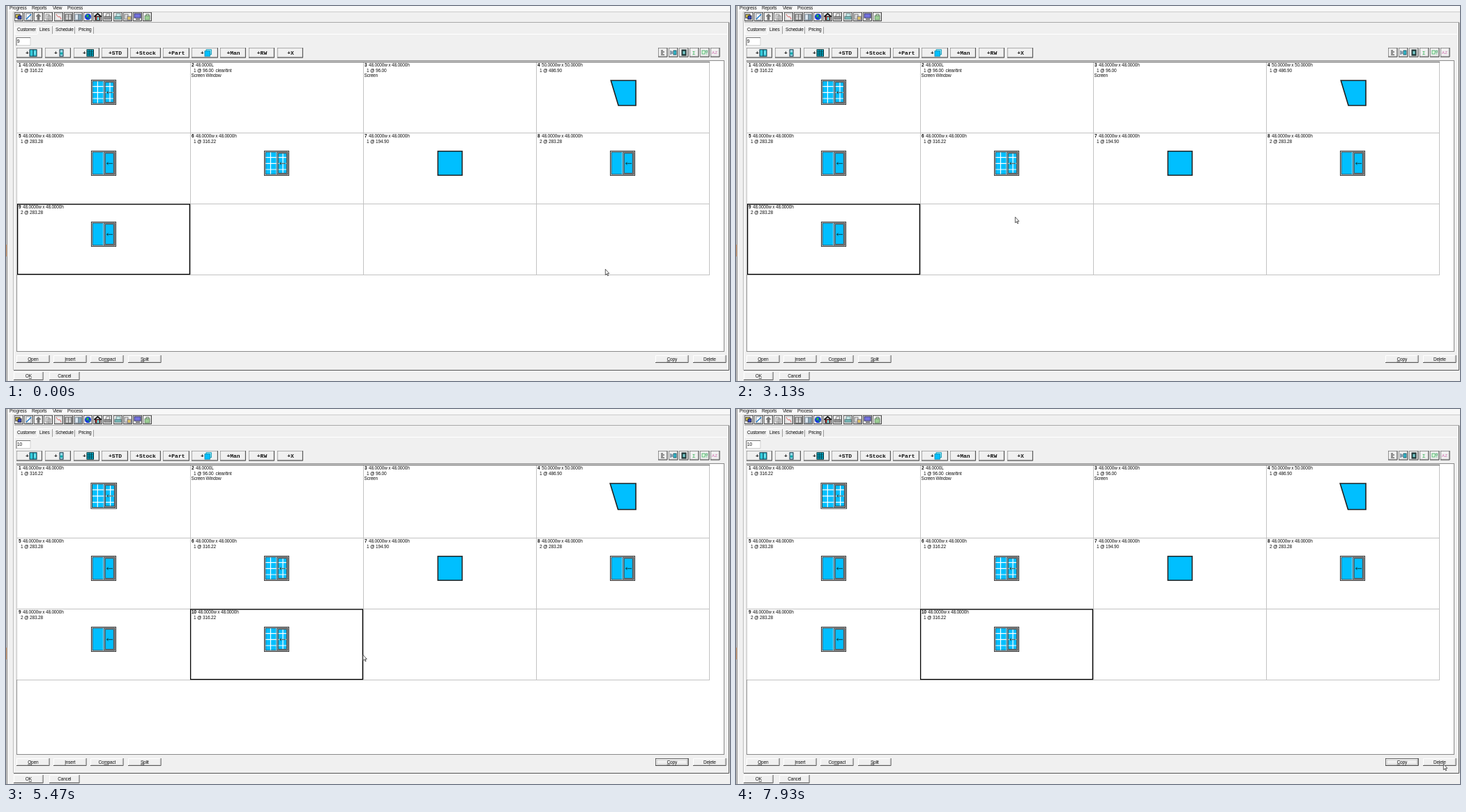
Animation of 1038 by 539 pixels, one loop 8000 ms. Source, as an HTML page:

```html
<!DOCTYPE html>
<html lang="en">
<head>
<meta charset="utf-8">
<title>Order lines</title>
<style>
  html, body { margin: 0; width: 100%; height: 100%; overflow: hidden; background: #f0f0f0; }
  svg { display: block; }
  text { font: 6.5px "Liberation Sans", Arial, sans-serif; letter-spacing: -.19px; white-space: pre; fill: #111; }
  .b { font-weight: bold; }
  .mid { text-anchor: middle; }
  .mono { font: bold 8px "Liberation Mono", monospace; letter-spacing: 0; }
  .u { text-decoration: underline; }
</style>
</head>
<body>
<svg width="1038" height="539" viewBox="0 0 1038 539">
  <g id="frame"></g>
  <g id="sheet"></g>
  <g id="cursor">
    <path d="M.3 .3V8.6L2.2 6.9L3.6 9.8L4.7 9.3L3.4 6.4H5.8Z" fill="#fff" stroke="#333" stroke-width=".8"/>
    <g id="stack" fill="#fff" stroke="#333" stroke-width=".8">
      <path d="M6 5.8h4v3h-4zM8 7.2h4v3h-4zM10 8.6h4v3h-4z"/>
    </g>
  </g>
</svg>
<script>
const $ = id => document.getElementById(id);
const BLUE = '#00bfff', DARK = '#222';

const rect = (x, y, w, h, fill, stroke = 'none', sw = 1) =>
  `<rect x="${x}" y="${y}" width="${w}" height="${h}" fill="${fill}" stroke="${stroke}" stroke-width="${sw}"/>`;
const path = (d, stroke, sw = 1, fill = 'none') =>
  `<path d="${d}" fill="${fill}" stroke="${stroke}" stroke-width="${sw}"/>`;
const text = (x, y, s, cls = '') => `<text x="${x}" y="${y}" class="${cls}">${s}</text>`;

// Raised box: light top left, dark bottom right
const bevel = (x, y, w, h, dark = '#555') => rect(x, y, w, h, '#f0f0f0') +
  path(`M${x + .5} ${y + h}V${y + .5}H${x + w}`, '#fff') +
  path(`M${x} ${y + h - .5}H${x + w - .5}V${y}`, dark) +
  path(`M${x + 1} ${y + h - 1.4}H${x + w - 1.4}V${y + 1}`, '#bbb', .6);

// Label with one underlined letter
const button = (x, y, w, h, label, key) => {
  const s = key < 0 ? label :
    `${label.slice(0, key)}<tspan class="u">${label[key]}</tspan>${label.slice(key + 1)}`;
  return bevel(x, y, w, h) + text(x + w / 2, y + h / 2 + 2.2, s, 'mid');
};

const toolIcons = [
  rect(2, 3, 6, 5, '#ffe94a', '#223') + rect(5, 5, 5, 5, '#3348c8', '#223'),
  rect(3, 2, 7, 9, '#fff', '#567', .7) + path('M3 10L10 3', '#1675c8', 1.5),
  path('M6.5 2L10 6H8V11H5V6H3Z', '#666', .5, '#777'),
  path('M3 3h5v7h-5zM6 5h4v6h-4z', '#888', .9, '#ddd'),
  rect(2, 2, 9, 9, '#eee', '#aaa', .6) + path('M3 3L6 7L8 6L10 10', '#d66', 1),
  rect(2, 3, 9, 8, '#fff', '#333') + path('M2 5.5h9M2 8h9M6.5 3v8', '#555', .8),
  rect(2, 3, 5, 8, '#dfe9f2', '#567', .8) + rect(7, 3, 4, 8, '#8ab', '#567', .8),
  '<circle cx="6.5" cy="6.5" r="4.6" fill="#1638d8"/>' + path('M4 4l3-1 1 3-3 2zM7 8l3-1-1 3z', 'none', 0, '#21b94b'),
  path('M1.5 6.5L6.5 2L11.5 6.5', '#111', 1.8) + rect(3, 6, 7, 5, '#b33', '#111') + rect(5.5, 7, 3, 4, '#6dd'),
  rect(2, 6, 9, 4, '#999', '#555', .8) + path('M4 6L5 2H10L9 6Z', '#555', .7, '#eee'),
  rect(2, 6, 9, 4, '#7bb', '#466', .8) + rect(4, 2, 6, 4, '#cee', '#466', .7),
  rect(2, 3, 5, 7, '#ddd', '#666', .8) + rect(6, 6, 5, 5, '#e4c768', '#557', .8),
  rect(2, 2, 9, 6, '#7472e0', '#336') + path('M4 10h6', '#555', 1.5),
  rect(3, 5, 7, 6, '#9ccf94', '#575', .8) + path('M5 5V3H9V5', '#575', 1)
];

const windowIcon = rect(0, 0, 10, 9.5, '#3cd', '#134', 1) + path('M5 0v9.5', '#134', 1) + path('M7.5 2v5', '#bff', 1);
const gridIcon = rect(0, 0, 9.5, 9.5, '#0ac', '#033', 1) + path('M3.2 0v9.5M6.3 0v9.5M0 3.2h9.5M0 6.3h9.5', '#033', .8);
const doorIcon = rect(2, 0, 5, 9.5, '#9de', '#134', 1) + rect(3, 4, 3, 3, '#0aa');
const stackIcon = rect(2, 0, 7.5, 7, '#8ef', '#08a', .8) + rect(0, 2, 7.5, 7.5, BLUE, '#08a', .8);
const addButtons = [
  [15, 37, windowIcon], [56, 37, doorIcon], [97, 37, gridIcon], [137, 38, '+STD'], [178, 44, '+Stock'],
  [225, 38, '+Part'], [266, 38, stackIcon], [307, 37, '+Man'], [348, 37, '+RW'], [389, 37, '+X']
];

const sideIcons = [
  path('M4 4h3M4 6h5M4 8h3M4 10h5', '#333', 1),
  path('M3 4v6M5 5v4', '#246', 1) + rect(7, 4, 4, 6, '#3bc', '#145', .8),
  rect(4, 3, 6, 8, '#355', '#122', 1) + rect(5.5, 5, 3, 4, '#7cc'),
  text(4.3, 9.5, 'Σ').replace('<text', '<text style="fill:#2a4"'),
  rect(3, 4, 4, 5, '#dfd', '#4a6', .8) + path('M8.5 4h2v3h-2zM8.5 9h2', '#4a6', .8),
  text(2, 9, 'A<tspan dx=".4">Z</tspan>').replace('<text', '<text style="fill:#c6a;font-size:6px"')
];

function drawFrame() {
  let s = rect(0, 0, 1038, 539, '#f0f0f0') + rect(2, 0, 1036, 7.5, '#f8f8f8') +
    rect(0, 0, 1, 539, '#d4d4d4') + rect(1, 0, 1, 539, '#858585') + rect(0, 343, 1.3, 17, '#d2a078');
  [[5, 'Progress'], [37, 'Reports'], [67, 'View'], [88, 'Process']].forEach(([x, t]) => s += text(x, 5.2, t));
  s += path('M10 8.5H1038', '#cfcfcf') + path('M11 23.5H1037', '#a8a8a8') + path('M11.5 9V523', '#fff') +
    path('M10.5 9V523', '#b8b8b8') + path('M11 523.5H1036.5V24', '#555');
  toolIcons.forEach((icon, i) => {
    const x = Math.round(12 + i * 14.15);
    s += bevel(x, 9, 13, 13) + rect(x + .5, 9.5, 12, 12, 'none', '#444', .8) + `<g transform="translate(${x} 9)">${icon}</g>`;
  });
  s += path('M12 40.5H45M67 40.5H1035', '#fff') + path('M45.5 40V28.5H66', '#fff') +
    path('M66.5 40V29M98.5 40V30M125.5 40V30', '#888', .8) + path('M13.5 40V30.5H45M67 30.5H98M100 30.5H125', '#fff');
  [[16, 36.3, 'Customer'], [48, 35.5, 'Lines'], [71, 36.3, 'Schedule'], [104, 36.3, 'Pricing']]
    .forEach(([x, y, t]) => s += text(x, y, t));

  for (const [x, w, face] of addButtons) {
    s += bevel(x, 60, w, 14.5, DARK) + rect(x + .3, 60.3, w - .6, 14, 'none', '#777', .6);
    s += face[0] === '+' ? text(x + w / 2 + .5, 70, face, 'mono mid')
      : text(x + 13, 70, '+', 'mono') + `<g transform="translate(${x + 19} 62.7)">${face}</g>`;
  }
  sideIcons.forEach((icon, i) => {
    const x = 935 + i * 15;
    s += bevel(x, 60, 13.5, 13.5) + rect(x + .5, 60.5, 12.5, 12.5, 'none', '#666', .7) +
      `<g transform="translate(${x} 60)">${icon}</g>`;
  });

  s += rect(15.5, 78.5, 1014, 418, '#fff', '#8a8a8a');
  [[15, 'Open', 0], [68, 'Insert', 0], [121, 'Compact', 2], [175, 'Split', 0], [931, 'Copy', 0], [985, 'Delete', 2]]
    .forEach(([x, t, k]) => s += button(x, 502, 47.6, 11, t, k));
  s += button(11, 526, 42.6, 12, 'OK', 1) + button(62, 526, 43.6, 12, 'Cancel', -1);
  $('frame').innerHTML = s;
}

// Sliding window w units wide; bars adds the white muntins
function slider(x, y, w, bars) {
  const at = f => (f * w).toFixed(1);
  const mid = w / 2, sash = [mid + 1.5, 3, mid - 4.5, w - 6];
  let s = rect(.4, .4, w - .8, w - .8, '#fff', DARK, .9) + rect(2, 2, w - 4, w - 4, BLUE, DARK, .8);
  if (bars) s += path(`M${at(.26)} 2.4V${w - 2.4}M${at(.75)} 3V${w - 3}` +
    [.27, .51, .75].map(f => `M2.4 ${at(f)}H${w - 3}`).join(''), '#fff', 1.2);
  s += rect(...sash, 'none', DARK, 2.2) + rect(...sash, 'none', '#b8c4c8', .8) +
    path(`M${mid - .4} 2V${w - 2}`, '#dde', .8) +
    path(`M${w - 5} ${mid + .3}H${mid + 4.5}m2 -1.8l-2 1.8l2 1.8`, '#133', .9);
  return `<g transform="translate(${x} ${y})">${s}</g>`;
}

const SIZE = '48.0000w x 48.0000h';
const lines = [
  { price: '1 @ 316.22', kind: 'bars' },
  { size: '48.0000L', price: '1 @ 96.00  clear/tint', note: 'Screen Window' },
  { price: '1 @ 96.00', note: 'Screen' },
  { size: '50.0000w x 50.0000h', price: '1 @ 486.90', kind: 'slant' },
  { price: '1 @ 283.28', kind: 'plain' },
  { price: '1 @ 316.22', kind: 'bars' },
  { price: '1 @ 194.90', kind: 'fixed' },
  { price: '2 @ 283.28', kind: 'plain' },
  { price: '2 @ 283.28', kind: 'plain' },
  { price: '1 @ 316.22', kind: 'bars' }
];

function drawSheet({ selected, count, copyFocus }) {
  const grown = count > 9;
  const rows = grown ? [80, 185, 287, 389] : [80, 182, 284, 386];
  let s = rect(15, 45.5, 20, 11, '#fff', '#c8c8c8', .8) + path('M15 57V45.5H35', '#777') +
    text(16, 53.3, selected + 1);
  s += path([0, 1, 2, 3, 4].map(i => `M${16 + i * 248 - .5 + (i > 0)} 80V${rows[3]}`).join('') +
    rows.slice(1).map(y => `M16 ${y + .5}H1009`).join(''), '#c3c3c3') + path('M16 80.5H1009', '#777', 1.3);

  lines.slice(0, count).forEach(({ size = SIZE, price, note, kind }, i) => {
    const x = 16 + i % 4 * 248, row = i >> 2, top = rows[row];
    const base = row ? top + 6.7 : 87;
    s += text(x + 2, base, i + 1, 'b') + text(x + (i > 8 ? 11 : 8), base, size) + text(x + 5, base + 7.8, price);
    if (note) s += text(x + 1.5, base + 15.2, note);
    const big = grown && !row ? 1 : 0;
    const px = x + 106 - big / 2, py = row ? top + 26 : 106, w = 36 + big * 1.5;
    if (kind === 'bars' || kind === 'plain') s += slider(px, py, w, kind === 'bars');
    if (kind === 'fixed') s += rect(x + 107.2, py + .7, 34.8, 34.6, BLUE, DARK, 1.5);
    if (kind === 'slant')
      s += path(`M${px + 1.2 - big * .6} 107H${x + 143}V${107 + w}H${px + 12}Z`, DARK, 1.6, BLUE);
  });

  s += rect(16.6 + selected % 4 * 248, rows[selected >> 2] + 1, 246.8, 100.6, 'none', '#000', 1.3);
  if (copyFocus) s += rect(931.4, 502.4, 46.8, 10.2, 'none', '#444', .8) + rect(933.5, 504.5, 42.6, 6, 'none', '#bbb', .5);
  $('sheet').innerHTML = s;
}

const LOOP = 8000, STEP = 1000 / 15;
const states = [
  { from: 0, selected: 8, count: 9 },
  { from: 49, selected: 5, count: 9, copyFocus: true, stack: true },
  { from: 73, selected: 9, count: 10, copyFocus: true }
];

// Pointer stops: step, x, y
const stops = [
  [0, 859, 378], [1, 843, 341], [8, 843, 341], [14, 380, 241], [16, 366, 250], [19, 366, 250],
  [24, 410, 256], [28, 397.5, 250.5], [33, 397.5, 250.5], [34, 397, 250], [36, 397, 250],
  [39, 394, 237], [43, 394, 237], [47, 400, 303], [53, 427, 357], [65, 427, 357], [66, 421, 356],
  [71, 418, 349], [73, 418, 349], [82, 511.5, 353], [85, 575, 369], [98, 991, 495],
  [105, 463, 306], [111, 1005, 501], [115, 845, 463], [119, 1014, 510], [120, 1014, 510]
];

function pointer(n) {
  const i = Math.max(1, stops.findIndex(p => p[0] >= n));
  const [n0, x0, y0] = stops[i - 1], [n1, x1, y1] = stops[i];
  const u = (n - n0) / (n1 - n0), e = u * u * (3 - 2 * u);
  return [x0 + (x1 - x0) * e, y0 + (y1 - y0) * e];
}

let shown;
function render(now) {
  const n = Math.min(119, Math.floor((now % LOOP + 5) / STEP));
  const state = states.findLast(s => n >= s.from);
  if (state !== shown) {
    drawSheet(state);
    $('stack').style.display = state.stack ? '' : 'none';
    shown = state;
  }
  $('cursor').setAttribute('transform', `translate(${pointer(n)})`);
}

drawFrame();
const start = performance.now();
render(0);
requestAnimationFrame(function tick() {
  render(performance.now() - start);
  requestAnimationFrame(tick);
});
</script>
</body>
</html>
```
